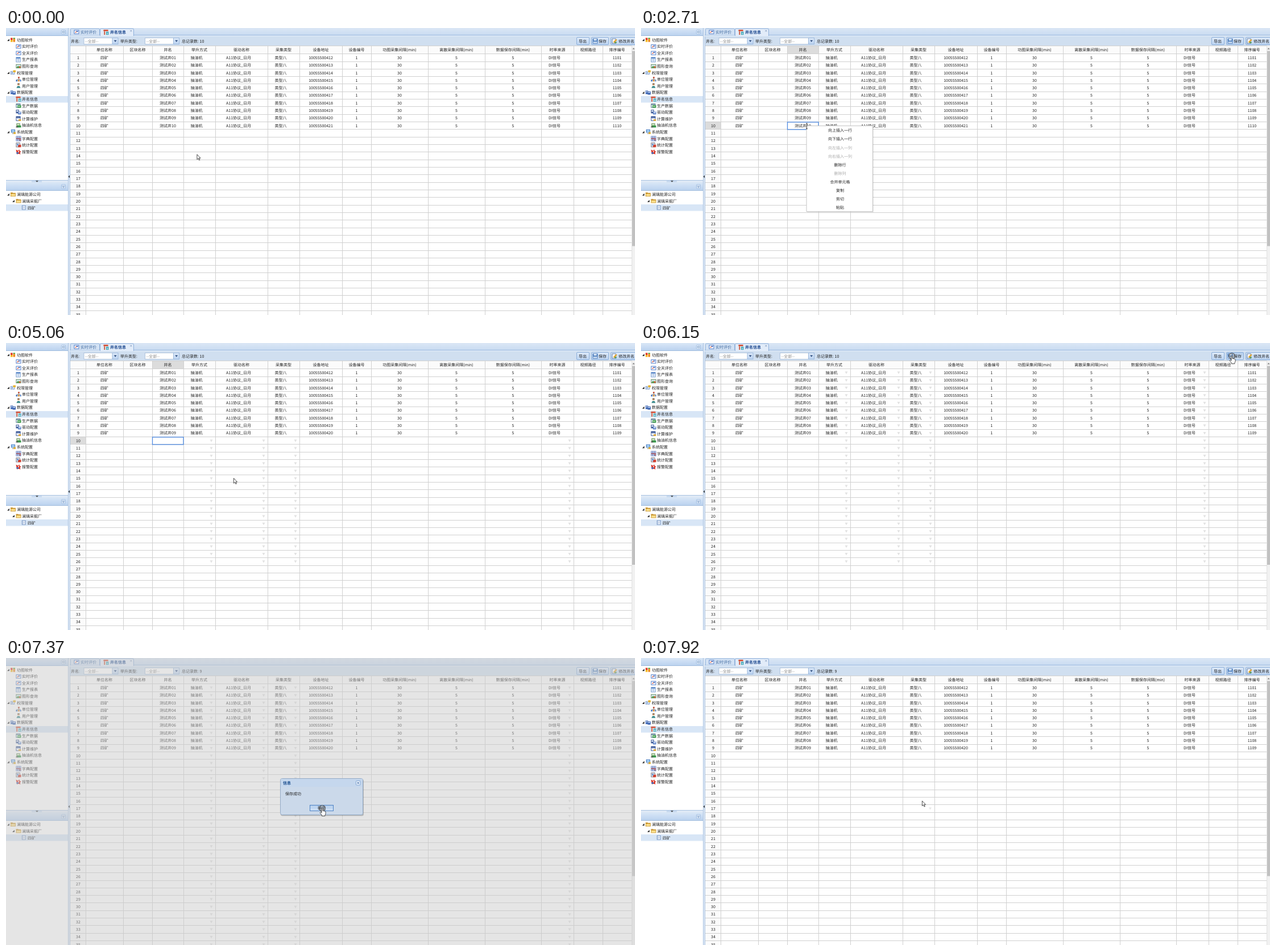
Recreate the animation shown at these times as an HTML page. Size 1106x506 px, loop 8 s.

```html
<!DOCTYPE html>
<html>
<head>
<meta charset="utf-8">
<style>
html, body { margin: 0; width: 100%; height: 100%; overflow: hidden; background: #fff; }
svg { display: block; }
text { font: 7px "Noto Sans CJK SC", "Noto Sans CJK", "Noto Sans CJK JP", sans-serif; fill: #222; text-rendering: geometricPrecision; white-space: pre; }
</style>
</head>
<body>
<svg id="stage" width="1106" height="506" viewBox="0 0 1106 506">
  <defs>
    <linearGradient id="panel" x2="0" y2="1"><stop stop-color="#dae7f6"/><stop offset=".5" stop-color="#c9dcf3"/><stop offset="1" stop-color="#b9d1ee"/></linearGradient>
    <linearGradient id="tabs" x2="0" y2="1"><stop stop-color="#dbe7f5"/><stop offset="1" stop-color="#c6d9f1"/></linearGradient>
    <linearGradient id="button" x2="0" y2="1"><stop stop-color="#dfebfa"/><stop offset="1" stop-color="#bbd3f1"/></linearGradient>
    <linearGradient id="hot" x2="0" y2="1"><stop stop-color="#b3cdec"/><stop offset="1" stop-color="#cfe1f7"/></linearGradient>
    <linearGradient id="plain" x2="0" y2="1"><stop stop-color="#fafafa"/><stop offset="1" stop-color="#e2e6ec"/></linearGradient>
  </defs>
</svg>
<script>
const LOOP = 8000;
const stage = document.getElementById('stage');

function add(parent, tag, attrs, content) {
  const node = document.createElementNS('http://www.w3.org/2000/svg', tag);
  for (const k in attrs) node.setAttribute(k, attrs[k]);
  if (content !== undefined) node.textContent = content;
  parent.appendChild(node);
  return node;
}
const group = parent => add(parent, 'g', {});
const rect = (p, x, y, width, height, fill, more) => add(p, 'rect', { x, y, width, height, fill, ...more });
const path = (p, d, fill, more) => add(p, 'path', { d, fill, ...more });
const text = (p, x, y, s, more) => add(p, 'text', { x, y: y + 2.5, ...more }, s);
const mid = (p, x, y, s, more) => text(p, x, y, s, { 'text-anchor': 'middle', ...more });
const line = (p, d, stroke, width = 1) => path(p, d, 'none', { stroke, 'stroke-width': width });
const show = (node, on) => node.setAttribute('visibility', on ? 'visible' : 'hidden');

// Icons on a 10 x 10 grid: "colour path" layers separated by "|"
const ICONS = {
  bars: '#e03a2c M0 1h4v4h-4z|#f5b921 M0 5h4v4h-4z|#43a53c M5 1h4v2h-4z|#f08a24 M5 3h4v6h-4z',
  page: '#3f6fc4 M0 1h10v8h-10z|#fff M1 2h8v6h-8z|#e0563c M2 6l3-3 1 1-3 3z|#3f6fc4 M5 3h3v2h-3z',
  sheet: '#5d8ac9 M0 0h9v10h-9z|#fff M1 3h7v6h-7z|#8fb0dc M1 5h7v1h-7zM4 3h1v6h-1z',
  image: '#5c7f55 M0 1h10v8h-10z|#d8edf7 M1 2h8v6h-8z|#57a04a M1 8l3-4 2 2 1-2 2 4z|#e05a33 M6 5h3v3h-3z',
  keys: '#5a80bd M0 2h8v6h-8z|#fff M1 3h6v4h-6z|#e9b531 M5 0h5v4h-5z|#6f9ad3 M2 4h3v2h-3z',
  org: '#c04a32 M4 0h3v3h-3z|#777 M5 3h1v2h-1zM1 5h8v1h-8z|#3b6ebc M0 6h3v3h-3z|#d88b2b M4 6h3v3h-3z|#3b6ebc M8 6h2v3h-2z',
  user: '#6b4a2d M3 0h4v3h-4z|#f0c49a M3 2h4v2h-4z|#3b8a8c M1 9l2-4h4l2 4z',
  data: '#3c66b5 M0 1h5v7h-5z|#fff M1 2h3v1h-3zM1 4h3v1h-3z|#2d58aa M4 3h6v6h-6z|#cfe0fa M5 4h4v2h-4z',
  well: '#d04a30 M0 0h9v3h-9z|#e9e9e9 M1 3h8v7h-8z|#c6523d M1 3h2v7h-2z|#31a0b4 M5 4h5v6h-5z|#fff M6 6h3v1h-3zM6 8h3v1h-3z',
  prod: '#476b86 M0 1h9v8h-9z|#e7f2f2 M1 3h7v5h-7z|#3d9c49 M3 4h7v5h-7z|#fff M4 6h4v1h-4z',
  drive: '#405a93 M0 0h6v7h-6z|#cfdcf3 M1 1h4v3h-4z|#3d6cc0 M4 4h6v5h-6z|#fff M5 5h4v2h-4z',
  calc: '#2d4d91 M0 0h9v9h-9z|#fff M1 3h7v5h-7z|#7b91bd M2 4h2v1h-2zM5 4h2v1h-2z|#e8ab32 M5 6h5v3h-5z',
  pump: '#55854a M1 1h7v7h-7z|#d8e8c9 M2 2h5v3h-5z|#38974a M3 5h7v4h-7z|#555 M0 7h4v2h-4z',
  sys: '#3e73bd M1 0h8v6h-8z|#a6d2f5 M2 1h6v4h-6z|#b5b5b5 M3 7h5v2h-5z|#e1b13b M6 5h4v4h-4z',
  grid: '#5976bd M0 0h10v10h-10z|#fff M1 1h2v2h-2zM4 1h2v2h-2zM7 1h2v2h-2zM1 7h2v2h-2zM4 7h2v2h-2z|#e0725c M1 4h2v2h-2zM4 4h2v2h-2zM7 4h2v5h-2z',
  stat: '#667 M0 0h8v9h-8z|#f2f2f2 M1 1h6v7h-6z|#d2402f M4 4h6v5h-6z|#6493d2 M2 2h3v4h-3z',
  alarm: '#d8372a M0 1l5 2 1-3 2 4 2 0-2 3 1 3-4-1-3 1z|#3e6db8 M1 6h4v3h-4z|#fff M4 4h2v2h-2z',
  folder: '#c99632 M0 1h4l1 1h5v7h-10z|#fbe08e M1 4h8v4h-8z',
  leaf: '#5d82b8 M1 0h8v9h-8z|#fff M2 1h6v7h-6z|#7fa0cf M3 2h1v5h-1zM5 3h2v1h-2zM5 5h2v1h-2z',
  disk: '#4477b8 M0 0h10v10h-10z|#e9f2fc M2 1h6v3h-6z|#cfdff2 M1 6h8v3h-8z',
  edit: '#4f6f9f M0 0h8v10h-8z|#fff M1 1h6v8h-6z|#e3a52f M3 6l5-5 2 2-5 5-2 0z|#4c9a3c M5 7h4v2h-4z'
};
function icon(p, name, x, y, size = 9) {
  const g = add(p, 'g', { transform: `translate(${x} ${y - size / 2}) scale(${size / 10})` });
  ICONS[name].split('|').forEach(layer => {
    const cut = layer.indexOf(' ');
    path(g, layer.slice(cut + 1), layer.slice(0, cut));
  });
}

// ---- Sidebar ----
const base = group(stage);
rect(base, 0, 0, 1106, 506, '#fff');
rect(base, 109, 0, 4, 506, '#dfe9f6');
line(base, 'M109.5 0V506M112.5 14V506', '#a9c2e0');
function panelHead(y, h, down) {
  rect(base, 0, y, 109, h, 'url(#panel)');
  line(base, `M0 ${y + h - .5}H109`, '#9fbbdd');
  rect(base, 97.5, y + h / 2 - 3.5, 7, 7, '#e4eefa', { rx: 1, stroke: '#8eb0dc', 'stroke-width': .7 });
  const cy = y + h / 2;
  line(base, down ? `M99 ${cy - 2}l2 2 2-2M99 ${cy}l2 2 2-2` : `M101 ${cy - 2}l-2 2 2 2M103.5 ${cy - 2}l-2 2 2 2`, '#4673ad', .8);
}
panelHead(0, 14, false);
rect(base, 0, 268, 109, 5, '#dfe9f6');
line(base, 'M0 268.5H109', '#a9c2e0');
path(base, 'M45 269h18v3h-18z', '#c7d9ef');
path(base, 'M52 269.3h5l-2.5 2.5z', '#444');
panelHead(272, 15, true);
path(base, 'M112 259.5v5l-2.5-2.5z', '#444');

function branch(x, y) { path(base, `M${x} ${y + 2}h4v-4z`, '#333'); }
const tree = [
  ['功图软件', 'bars', ['实时评价', 'page'], ['全天评价', 'page'], ['生产报表', 'sheet'], ['图形查询', 'image']],
  ['权限管理', 'keys', ['单位管理', 'org'], ['用户管理', 'user']],
  ['数据配置', 'data', ['井名信息', 'well'], ['生产数据', 'prod'], ['驱动配置', 'drive'], ['计算维护', 'calc'], ['抽油机信息', 'pump']],
  ['系统配置', 'sys', ['字典配置', 'grid'], ['统计配置', 'stat'], ['报警配置', 'alarm']]
];
rect(base, 0, 120, 109, 11.5, '#d8e6f6');
let treeY = 21;
tree.forEach(([label, kind, ...kids]) => {
  branch(2, treeY);
  icon(base, kind, 8, treeY);
  text(base, 19, treeY, label);
  treeY += 11.6;
  kids.forEach(([name, sub]) => {
    icon(base, sub, 17.5, treeY);
    text(base, 28, treeY, name);
    treeY += 11.6;
  });
});
rect(base, 0, 311, 109, 11.5, '#d8e6f6');
branch(2, 293.5); icon(base, 'folder', 8, 293.5); text(base, 19, 293.5, '澜璃能源公司');
branch(11, 305); icon(base, 'folder', 17.5, 305); text(base, 28, 305, '澜璃采掘厂');
icon(base, 'leaf', 27, 317, 8.5); text(base, 38, 317, '四矿');

// ---- Tabs and toolbar ----
rect(base, 112, 0, 994, 14, 'url(#tabs)');
rect(base, 112, 12.5, 994, 2.5, '#d9e6f5');
line(base, 'M112 12.5H1106', '#9dbbdf');
path(base, 'M113.5 12.5V3q0-2 2-2H162.500q2 0 2 2V12.500', '#d3e2f4', { stroke: '#9dbbdf' });
path(base, 'M165.500 14V3q0-2 2-2H222.500q2 0 2 2V14', '#e2ecf9', { stroke: '#8fb0da' });
icon(base, 'page', 119.5, 7);
text(base, 131, 7, '实时评价', { style: 'fill:#416a9f' });
icon(base, 'well', 171.5, 7.5);
text(base, 183, 7, '井名信息', { style: 'fill:#15428b;font-weight:bold' });
line(base, 'M218.300 3.500l3 3m0-3l-3 3', '#7d97ba', .8);

rect(base, 113, 15, 993, 16, '#d0dff0');
function combo(x, w) {
  rect(base, x + .5, 17.5, w, 11, '#fff', { stroke: '#b0c4dc' });
  text(base, x + 2.5, 23, '--全部--', { style: 'fill:#888' });
  rect(base, x + w, 17.5, 10, 11, 'url(#button)', { stroke: '#9db9dc' });
  path(base, `M${x + w + 2.7} 21.500h5l-2.500 3.200z`, '#2f4f80');
}
text(base, 114, 23, '井名:');
combo(136.5, 50.5);
text(base, 201, 23, '举升类型:');
combo(244, 50.5);
const count = text(base, 309, 23, '总记录数: 10');

function toolButton(x, w, label, labelX, kind) {
  const box = rect(base, x + .5, 16.500, w, 13, 'url(#button)', { rx: 1.5, stroke: '#8cafda' });
  if (kind) icon(base, kind, x + 2.5, 23);
  text(base, labelX, 23, label);
  return box;
}
toolButton(1003, 22, '导出', 1007);
const saveButton = toolButton(1029, 30, '保存', 1042, 'disk');
toolButton(1063, 50, '修改井名', 1077, 'edit');

// ---- Grid ----
const TOP = 45.7, PITCH = 13.32, ROWS = 35;
const rowY = n => TOP + PITCH * (n - .5);
const EDGES = [113, 140, 206, 257, 312, 368, 460, 516, 591, 642, 742, 842, 941, 998, 1049, 1100];
const HEADS = ['', '单位名称', '区块名称', '井名', '举升方式', '驱动名称', '采集类型', '设备地址', '设备编号', '功图采集间隔(min)', '离散采集间隔(min)', '数据保存间隔(min)', '时率来源', '视频路径', '排序编号'];
const DROPS = [4, 5, 6, 12];
const centre = c => (EDGES[c] + EDGES[c + 1]) / 2 - (DROPS.includes(c) ? 5 : 0);

rect(base, 113, 31, 987, 14.5, '#fbfbfb');
rect(base, 113, 31, 27, 475, '#fbfbfb');
const marks = group(base);
rect(marks, 113, 166, 27, 13, '#dcdcdc');
rect(marks, 257, 31, 55, 14.5, '#dcdcdc');

let rules = 'M113 31.500H1100';
for (let n = 0; n < ROWS; n++) rules += `M113 ${Math.floor(TOP + PITCH * n) + .5}H1100`;
EDGES.slice(1).forEach(x => rules += `M${x + .5} 31V506`);
line(base, rules, '#d0d0d0');
HEADS.forEach((h, c) => mid(base, (EDGES[c] + EDGES[c + 1]) / 2, 38.5, h));
for (let n = 1; n <= ROWS; n++) mid(base, 127, rowY(n), n);

let lastRow;
for (let n = 1; n <= 10; n++) {
  const g = lastRow = group(base);
  const no = String(n).padStart(2, '0');
  const cells = ['四矿', '', '测试井' + no, '抽油机', 'A11协议_日月', '类型八', 10055500411 + n, 1, 30, 5, 5, 'DI信号', '', 1100 + n];
  cells.forEach((v, i) => v !== '' && mid(g, centre(i + 1), rowY(n), v));
}

function dropMarks(from, to) {
  const g = group(base);
  for (let n = from; n <= to; n++) {
    DROPS.forEach(c => path(g, `M${EDGES[c + 1] - 9.500} ${rowY(n) - 2}h5l-2.500 4.500z`, '#e2e2e2'));
  }
  return g;
}
const dropsTop = dropMarks(1, 9), dropsMid = dropMarks(10, 26), dropsLow = dropMarks(27, 35);
const strayDrop = path(base, 'M506 263.500h5l-2.500 4z', '#e6e6e6');
const selection = rect(base, 257.5, 166, 54.5, 13, 'none', { stroke: '#4f8ae0', 'stroke-width': 1.3 });

rect(base, 1100.5, 31, 6, 475, '#f1f1f1');
path(base, 'M1101.500 37.500h4l-2-2.500z', '#777');
const thumb = rect(base, 1101, 40.500, 5, 344, '#c1c1c1');

// ---- Context menu ----
const ITEMS = ['向上插入一行', '向下插入一行', '向左插入一列', '向右插入一列', '删除行', '删除列', '合并单元格', '复制', '剪切', '粘贴'];
const OFF = [2, 3, 5];
const ITEM_TOP = 173.4, ITEM_H = 15.05;
const menu = group(stage);
rect(menu, 292, 174, 117, 151, '#000', { opacity: .08 });
rect(menu, 291, 172.500, 116.500, 151, '#fff', { stroke: '#c4c4c4' });
const hover = rect(menu, 291.5, ITEM_TOP, 115.5, ITEM_H, '#f2f2f2');
ITEMS.forEach((s, i) => mid(menu, 350, ITEM_TOP + ITEM_H * (i + .5), s, OFF.includes(i) ? { style: 'fill:#aaa' } : {}));

// ---- Message box ----
const dialog = group(stage);
rect(dialog, 0, 0, 1106, 506, '#ccc', { opacity: .5 });
rect(dialog, 483, 214, 146, 64.500, '#000', { rx: 3, opacity: .2 });
rect(dialog, 482.500, 212.500, 145, 64, '#cbd9ea', { rx: 3, stroke: '#94abc7' });
path(dialog, 'M483 227V215q0-2 2-2H625q2 0 2 2V227z', '#c5d7ed');
text(dialog, 487, 220.3, '信息', { style: 'fill:#15498b;font-weight:bold' });
rect(dialog, 615.5, 216.500, 7.500, 7.500, '#eaf2fc', { rx: 1, stroke: '#6f97cb', 'stroke-width': .8 });
line(dialog, 'M617.500 218.500l3.500 3.500m0-3.500l-3.500 3.500', '#35619e');
text(dialog, 491, 239, '保存成功');
const okBox = rect(dialog, 534.500, 259.500, 41, 10, 'url(#plain)', { stroke: '#7f91aa' });
mid(dialog, 555, 264.7, '确定');

// ---- Pointer ----
const ring = add(stage, 'circle', { r: 5.3, fill: '#888', 'fill-opacity': .3, stroke: '#555', 'stroke-width': 1.1 });
const pointer = group(stage);
const outline = { stroke: '#222', 'stroke-width': .8, 'stroke-linejoin': 'round' };
const shapes = {
  arrow: path(pointer, 'M.4.4V9.300L2.500 7.400 4 10.700 5.400 10 3.900 6.900H6.500z', '#fff', outline),
  hand: path(pointer, 'M-1 .8Q-1-.4 0-.4T1 .8V4.500Q2 3.800 2.700 4.800 3.800 4.200 4.300 5.300 5.800 4.800 6 6.300V9.500Q5.800 11 4.800 12V13.600H-.6V12L-3.600 8.500Q-4.200 7.300-3.200 6.900-2.400 6.700-1 8.200z', '#fff', outline),
  beam: path(pointer, 'M-1.500-4.800H1.500M0-4.800V4.800M-1.500 4.800H1.500', 'none', { stroke: '#333', 'stroke-width': .9 })
};
// time, x, y, shape, clicking
const MOVES = [
  [0, 335.5, 222.5, 'arrow'], [1430, 321, 207, 'arrow'], [1550, 306.5, 193.5, 'arrow'],
  [1700, 297, 180, 'arrow'], [1820, 291.5, 173, 'beam'], [1970, 291.5, 173, 'beam', 1],
  [2090, 291.5, 173, 'beam'], [2400, 291.5, 173, 'beam', 1], [2560, 291.5, 173, 'beam'],
  [3420, 299, 187, 'hand'], [3550, 310, 206, 'hand'], [3690, 314, 220.5, 'hand'],
  [3840, 318, 230, 'hand'], [3960, 323, 238, 'hand'], [4080, 327.5, 245, 'hand'],
  [4360, 327.5, 244.5, 'hand'], [4510, 327.5, 244.5, 'hand', 1], [4630, 327.5, 244.5, 'hand'],
  [4780, 327.5, 244.5, 'arrow'], [5060, 400, 238, 'arrow'], [5190, 513.5, 225, 'arrow'],
  [5330, 690, 180, 'arrow'], [5450, 880, 122, 'arrow'], [5570, 1042, 72, 'arrow'],
  [5730, 1041, 40, 'arrow'], [5850, 1039, 23, 'hand'], [6150, 1039, 23, 'hand', 1],
  [6400, 1039, 23, 'arrow'], [6550, 729.5, 176, 'arrow'], [6700, 650, 216, 'arrow'],
  [6820, 595, 248, 'arrow'], [6940, 555.5, 270, 'arrow'], [7240, 556, 265, 'hand'],
  [7370, 556, 265, 'hand', 1], [7520, 556, 265, 'arrow'], [7640, 525, 256, 'arrow'],
  [7760, 498.500, 249, 'arrow'], [7920, 494, 251.500, 'arrow']
];

function draw(t) {
  const within = (from, to) => t >= from && t < to;
  const [, x, y, shape, click] = MOVES.filter(m => m[0] <= t).pop();

  pointer.setAttribute('transform', `translate(${x} ${y})`);
  for (const k in shapes) show(shapes[k], k === shape);
  show(ring, click);
  ring.setAttribute('cx', x);
  ring.setAttribute('cy', y);

  show(marks, within(1970, 6150));
  show(selection, within(1970, 6150));
  show(lastRow, t < 4780);
  show(dropsTop, within(6150, 7520));
  show(dropsMid, within(4780, 7520));
  show(dropsLow, within(6400, 7520));
  show(strayDrop, t >= 7520);
  thumb.setAttribute('height', within(4780, 6550) ? 350.5 : 344);
  count.textContent = '总记录数: ' + (t < 6550 ? 10 : 9);
  saveButton.setAttribute('fill', within(5850, 6400) ? 'url(#hot)' : 'url(#button)');

  const menuOn = within(2710, 4780);
  const item = Math.floor((y - ITEM_TOP) / ITEM_H);
  show(menu, menuOn);
  show(hover, menuOn && shape === 'hand' && !OFF.includes(item));
  hover.setAttribute('y', ITEM_TOP + ITEM_H * item);

  show(dialog, within(6400, 7520));
  const okHot = within(7240, 7520);
  okBox.setAttribute('fill', okHot ? 'url(#hot)' : 'url(#plain)');
  okBox.setAttribute('stroke', okHot ? '#4f83c4' : '#7f91aa');
}

const start = performance.now();
function tick() {
  draw((performance.now() - start) % LOOP);
  requestAnimationFrame(tick);
}
tick();
</script>
</body>
</html>
```
